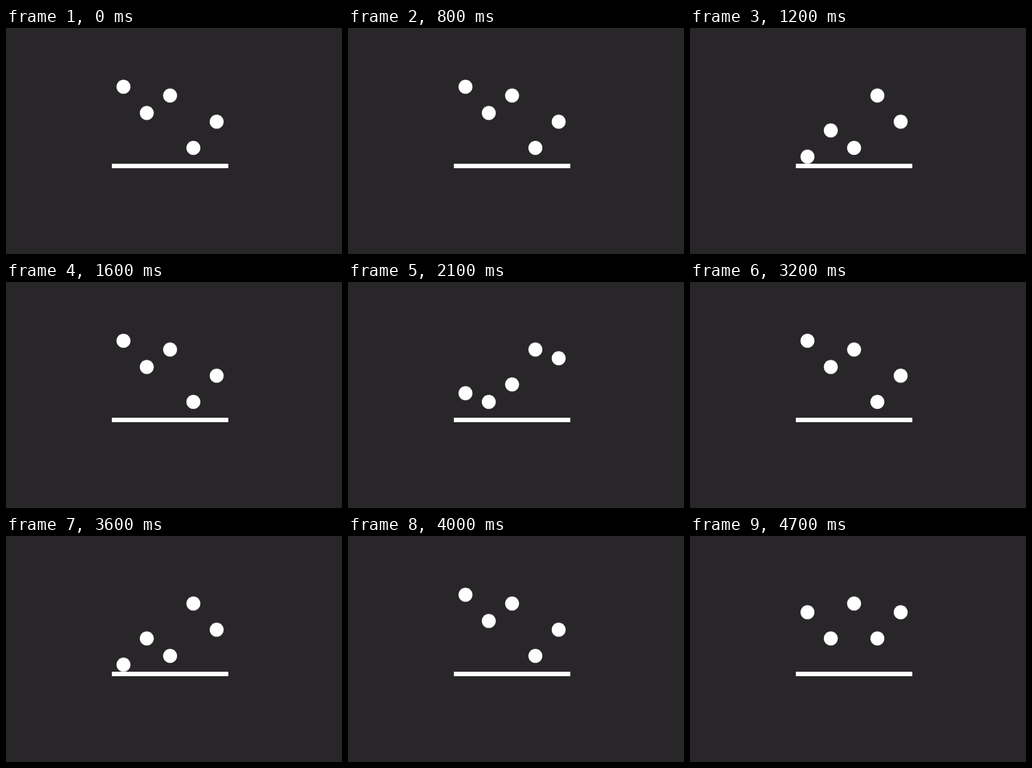
These frames come from a looping animation (600 px wide and 403 px high, 4.8 s). An HTML page without scripts:

```html
<!DOCTYPE html>
<html lang="en">
<head>
<meta charset="utf-8">
<title>Bouncing dots</title>
<style>
  html, body {
    margin: 0;
    width: 100%;
    height: 100%;
    overflow: hidden;
    background: #282629;
  }
  svg { display: block; width: 600px; height: 403px; fill: #fff; }

  /* Linear up and down, held in 100 ms ticks */
  .whole { animation: whole 800ms var(--delay, 0ms) infinite; }
  .half { animation: half 800ms var(--delay, 0ms) infinite; }

  @keyframes whole {
    0%, 100% { transform: translateY(0); animation-timing-function: steps(4, end); }
    50% { transform: translateY(124.6px); animation-timing-function: steps(4, end); }
  }
  /* Turns midway between two ticks */
  @keyframes half {
    0%, 100% { transform: translateY(15.6px); animation-timing-function: steps(4, jump-none); }
    50% { transform: translateY(109px); animation-timing-function: steps(4, jump-none); }
  }
</style>
</head>
<body>
<svg viewBox="0 0 600 403">
  <rect x="189" y="242" width="208" height="8"/>
  <circle class="whole" cx="209.8" cy="104.8" r="12.5"/>
  <circle class="half" cx="251.4" cy="104.8" r="12.5" style="--delay: -600ms"/>
  <circle class="half" cx="293" cy="104.8" r="12.5"/>
  <circle class="half" cx="334.6" cy="104.8" r="12.5" style="--delay: -300ms"/>
  <circle class="whole" cx="376.2" cy="104.8" r="12.5" style="--delay: -200ms"/>
</svg>
</body>
</html>
```
